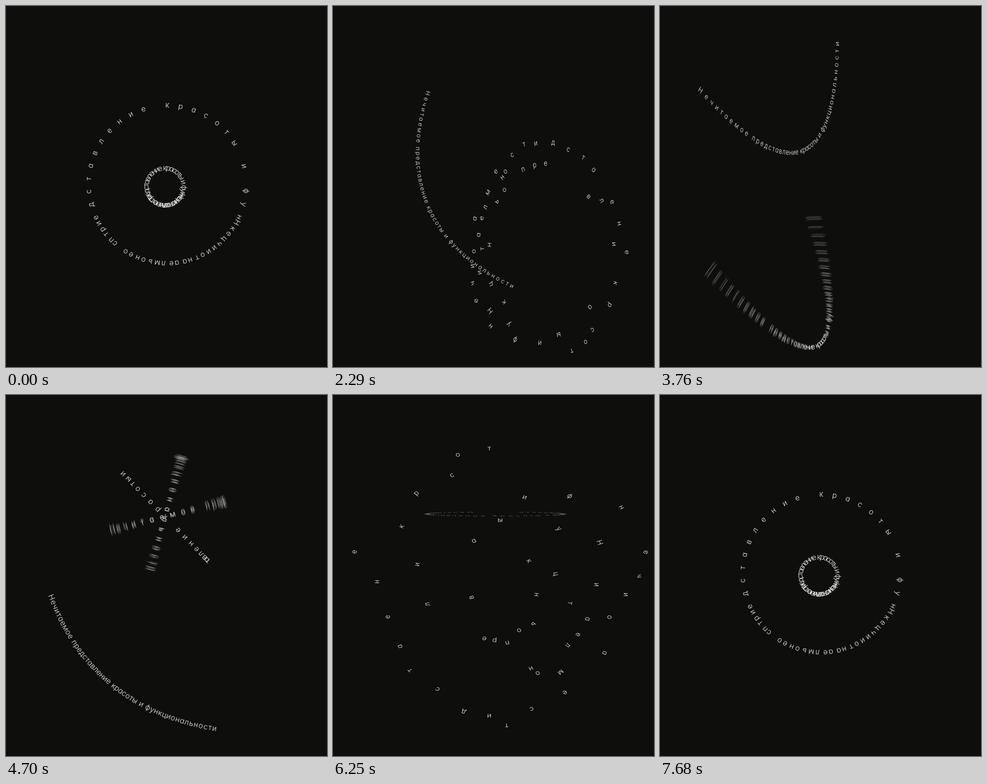
An HTML page with a canvas that plays this animation: 547x614 px, repeating every 7.71 s.

```html
<!DOCTYPE html>
<html lang="ru">
<head>
<meta charset="utf-8">
<style>
html, body { margin: 0; width: 100%; height: 100%; overflow: hidden; background: #0e0e0c; }
canvas { display: block; }
</style>
</head>
<body>
<canvas id="c" width="547" height="614"></canvas>
<script>
const ctx = document.getElementById('c').getContext('2d');
const LOOP = 7710, RAD = Math.PI / 180, MID = 25;
const text = 'Нечитаемое представление красоты и функциональности';
const glyphs = [...text].map(c => c === 'а' ? 'ɑ' : c); // single-storey a
ctx.font = '300 13px Inter, "Open Sans", sans-serif';
ctx.textAlign = 'center';

// Letter positions along the line from -1 to 1, with the middle letter at 0
function spread(tracking) {
  let x = 0;
  const pos = glyphs.map(g => {
    const w = ctx.measureText(g).width + tracking;
    x += w;
    return x - w / 2;
  });
  const half = (pos[pos.length - 1] - pos[0]) / 2;
  return pos.map(p => (p - pos[MID]) / half);
}

// Where the letters drift when the ring bursts (x, y per visible letter)
const burst = [
  375,200, 429,193, 437,224, 435,253, 387,293, 412,305, 410,332, 406,391, 343,376, 418,411,
  329,401, 308,409, 290,414, 303,494, 257,485, 211,477, 183,455, 225,372, 181,394, 149,425,
  116,386, 144,342, 78,360, 111,301, 113,251, 195,262, 146,206, 145,181, 180,155, 227,217,
  250,181, 308,160, 318,198, 375,152, 307,244, 353,256, 401,254, 432,290, 351,300, 444,338,
  404,353, 360,353, 370,409, 380,409, 386,451, 363,483, 337,484
];

// x, y: centre; R: ring radius; k: burst; W: half sweep; f: ring flatness; sx, sy: screen squash
// a: bend and b: direction of the open line; px, q: glyph scale; blur, fan: angles in degrees
const rest = { x: 275, y: 303.5, R: 134, k: 0, W: 241, rot: 0, f: 1, sx: 1, sy: 1,
  ax: 0, ay: 0, bx: 0, by: 0, px: 1, q: 1, blur: 0, fan: 0 };

// Each key: start, end of its hold, changed values
function track(keys) {
  let v = rest;
  return keys.map(([t0, t1, change]) => ({ t0, t1, v: v = { ...v, ...change } }));
}

const small = { x: 271, y: 307.5, R: 31.5, W: 241, sy: 1, px: 1, q: 1 };
const line = track([
  [0, 30, small],
  [760, 970, { x: 276, y: 345, R: 40, W: 190, q: .7 }],
  [1090, 1090, { x: 281, y: 395, R: 52, W: 142, sy: .87, ay: -86, q: .45 }],
  [1600, 1760, { x: 215, y: 330, R: 30, ax: 30, ay: -50, bx: 50, by: 80, q: .7 }],
  [2290, 2290, { x: 163, y: 343, R: 0, ax: 70, ay: -30, bx: 72.5, by: 164, px: .8, q: .8 }],
  [2410, 2590, { x: 158, y: 350, ax: 78 }],
  [3220, 3410, { x: 190, y: 290, ax: -10, ay: -100, bx: 120, by: 30, q: 1 }],
  [3760, 3760, { x: 241, y: 247, ax: -55, ay: -143, bx: 116.5, by: -41, px: .72 }],
  [4340, 4500, { x: 165, y: 490, ax: 40, ay: -42, bx: 130, by: 118, px: 1 }],
  [4700, 4700, { x: 183, y: 495, ax: 33.5, ay: -38.5, bx: 139.5, by: 111.5 }],
  [5140, 5320, { x: 270, y: 380, ax: 0, ay: 30, bx: 150, by: 20 }],
  [5950, 6110, { x: 276, y: 205, R: 110, W: 158, sy: .04, ay: 0, bx: 0, by: 0, q: .2 }],
  [6250, 6250, { y: 202.5, R: 117, sy: -.03, q: .1 }],
  [6770, 6950, { x: 274, y: 290, R: 50, W: 220, sy: .8, q: .9 }],
  [7680, LOOP, small]
]);

const ring = track([
  [0, 30, { rot: 360 }],
  [760, 970, { x: 270, y: 302, R: 140, k: .1, rot: 270 }],
  [1090, 1090, { y: 318, R: 134, k: 1, rot: 276, q: .85 }],
  [1600, 1760, { x: 283, k: 1.9, rot: 370 }],
  [2290, 2290, { x: 365, y: 412, R: 160, k: .45, rot: 470, sx: .72, px: .8, q: 1 }],
  [2410, 2590, { x: 372, y: 420, k: .3, rot: 478 }],
  [3220, 3410, { x: 200, y: 470, R: 0, k: 0, ax: -40, ay: -60, bx: 150, sx: 1 }],
  [3760, 3760, { x: 268, y: 578, ax: -94, ay: -173, bx: 88, by: -45, blur: 3 }],
  [4340, 4500, { x: 275, y: 207, R: 110, ax: 0, ay: 0, bx: 0, by: 0, rot: 570, f: 0, px: 1, blur: 0 }],
  [4700, 4700, { x: 271, R: 105, rot: 585.6, fan: 60, blur: 4 }],
  [5140, 5320, { x: 280, y: 300, R: 134, rot: 620, f: 1, fan: 0, blur: 0 }],
  [5950, 6110, { x: 283, y: 318, R: 145, k: 1.9, rot: 655 }],
  [6250, 6250, { x: 280, y: 324, R: 150, k: 1.6, rot: 661.5, q: .85 }],
  [6770, 6950, { x: 282, y: 304, k: .2, rot: 700, q: 1 }],
  [7680, LOOP, { x: 275, y: 303.5, R: 134, k: 0, rot: 720 }]
]);

const tight = spread(2), wide = spread(15);

// Burst radius and turn relative to the even ring
let n = 0;
const drift = glyphs.map((g, i) => {
  if (g === ' ') return { r: 0, turn: 0 };
  const x = burst[n++] - 270, y = burst[n++] - 318;
  const turn = Math.atan2(y, x) / RAD - 186 - wide[i] * 241;
  return { r: Math.hypot(x, y) - 134, turn: turn - 360 * Math.round(turn / 360) };
});

// Slope at a key: zero on holds, otherwise smooth passage
function slope(keys, i, p) {
  const a = keys[i - 1], b = keys[i], c = keys[i + 1];
  if (!a || !c || b.t1 > b.t0) return 0;
  const d0 = (b.v[p] - a.v[p]) / (b.t0 - a.t1), d1 = (c.v[p] - b.v[p]) / (c.t0 - b.t1);
  return d0 * d1 > 0 ? 2 * d0 * d1 / (d0 + d1) : 0;
}

function poseAt(keys, t) {
  let i = keys.length - 1;
  while (i && keys[i].t0 > t) i--;
  const a = keys[i], b = keys[i + 1];
  if (!b || t <= a.t1) return a.v;
  const h = b.t0 - a.t1, s = (t - a.t1) / h, e = s * s * (3 - 2 * s), pose = {};
  for (const p in rest) {
    pose[p] = a.v[p] + (b.v[p] - a.v[p]) * e +
      h * s * (1 - s) * ((1 - s) * slope(keys, i, p) - s * slope(keys, i + 1, p));
  }
  return pose;
}

function turned(x, y, deg) {
  const c = Math.cos(deg * RAD), s = Math.sin(deg * RAD);
  return [x * c - y * s, x * s + y * c];
}

// Offset of the place u on the line from its centre
function place(p, u, r, turn) {
  const th = (p.W * u + turn) * RAD;
  const [x, y] = turned(r * Math.sin(th), -r * Math.cos(th) * p.f, p.rot);
  return [x * p.sx + u * p.bx + u * u * p.ax, y * p.sy + u * p.by + u * u * p.ay];
}

function drawText(p, us) {
  glyphs.forEach((g, i) => {
    if (g === ' ') return;
    const u = us[i], d = drift[i];
    const turn = d.turn * Math.min(p.k, 1);
    const pos = place(p, u, p.R + p.k * d.r, turn);
    const a = place(p, u - .004, p.R, turn), b = place(p, u + .004, p.R, turn);
    const outer = Math.abs(p.W * u) > 90;
    const fan = outer ? Math.sign(u) * p.fan : 0;
    const blur = p.fan > 1 && !outer ? 0 : p.blur;
    const copies = blur > .1 ? 9 : 1;
    const angle = Math.atan2((b[1] - a[1]) / p.q, (b[0] - a[0]) / p.px);
    ctx.globalAlpha = copies > 1 ? .2 : .95;
    for (let j = 0; j < copies; j++) {
      const shift = fan + (copies > 1 ? blur * (j / 4 - 1) : 0);
      const [x, y] = turned(pos[0], pos[1], shift);
      ctx.setTransform(p.px, 0, 0, p.q, p.x + x, p.y + y);
      ctx.rotate(angle + shift * RAD);
      ctx.fillText(g, 0, 3.5);
    }
  });
}

const start = performance.now();
function frame() {
  const t = (performance.now() - start) % LOOP;
  ctx.setTransform(1, 0, 0, 1, 0, 0);
  ctx.globalAlpha = 1;
  ctx.fillStyle = '#0e0e0c';
  ctx.fillRect(0, 0, 547, 614);
  ctx.fillStyle = '#f4f4f0';
  drawText(poseAt(line, t), tight);
  drawText(poseAt(ring, t), wide);
  requestAnimationFrame(frame);
}
frame();
</script>
</body>
</html>
```
